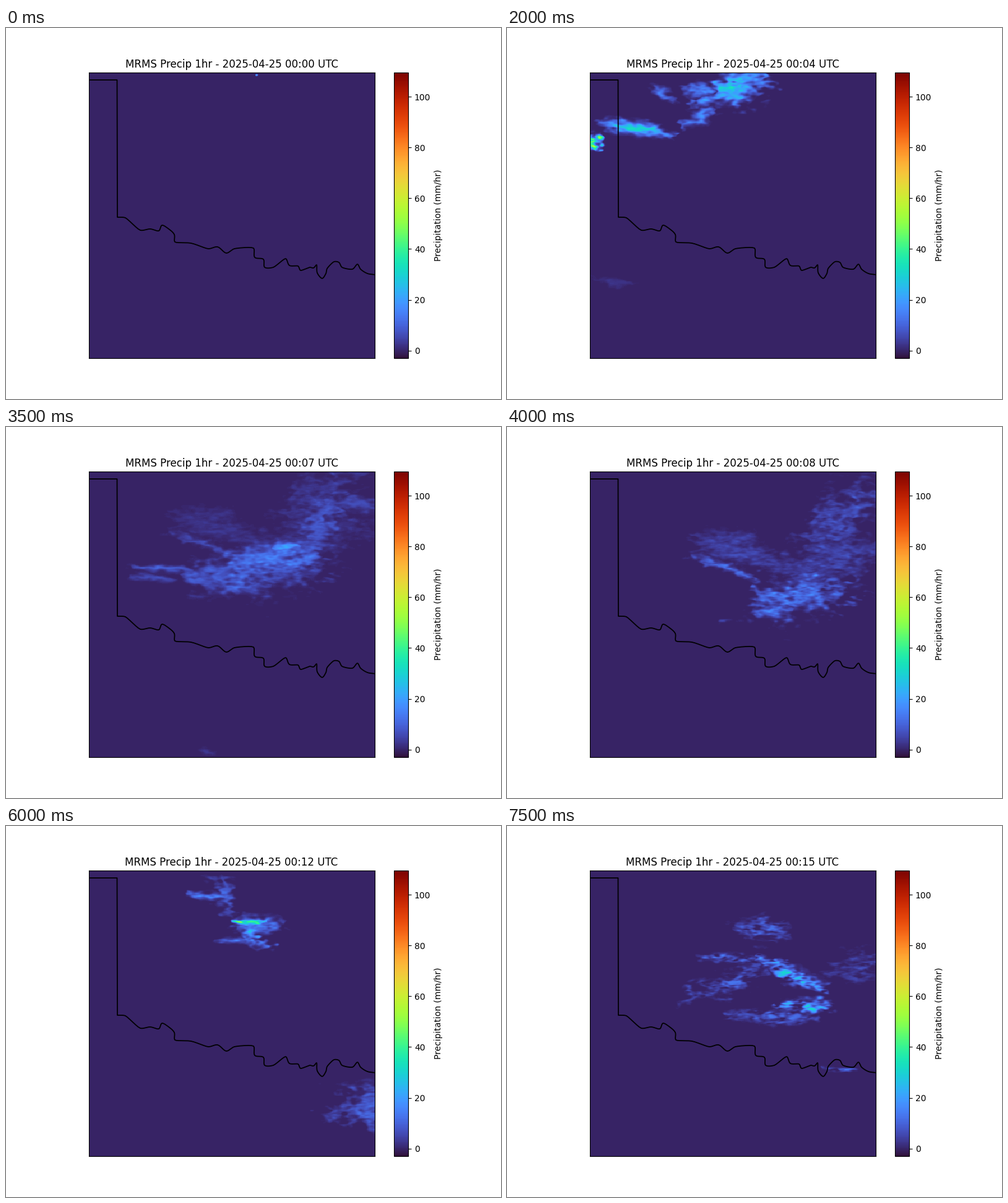
A matplotlib script for the animation above (8 s loop, 800 px wide and 600 px high).

```python
import numpy as np
import matplotlib.pyplot as plt
from matplotlib.animation import FuncAnimation

# Map box in stage pixels and the radar grid inside it
LEFT, RIGHT, TOP, BOTTOM = 134, 596, 72, 534
N = 400
CELL = (RIGHT - LEFT) / N
HOURS = 16
DRIFT = np.array([34, 38])  # storm motion in pixels per hour

mid = (np.arange(N) + 0.5) * CELL
X, Y = np.meshgrid(LEFT + mid, TOP + mid)
FX, FY = np.meshgrid(np.fft.fftfreq(N), np.fft.fftfreq(N))


def noise(rng, scales, stretch):
    """Smooth random field of unit deviation, stretched sideways."""
    total = np.zeros((N, N))
    for s in scales:
        white = np.fft.fft2(rng.standard_normal((N, N)))
        keep = np.exp(-2 * (np.pi * s) ** 2 * ((FX * stretch) ** 2 + FY ** 2))
        layer = np.fft.ifft2(white * keep).real
        total += layer / layer.std()
    return total / total.std()


class Scene:
    """Rain bands (x0, y0, x1, y1, width, peak mm/hr) at one hour."""

    def __init__(self, hour, rough, *bands):
        rng = np.random.default_rng(hour)
        self.hour, self.rough, self.bands = hour, rough, bands
        self.wx = noise(rng, (1.5, 3, 8), 2)
        self.wy = noise(rng, (1.5, 3, 8), 2)
        self.grain = noise(rng, (0.8, 1.8), 3)

    def rain(self, hour):
        """Rain carried along the drift to another hour."""
        dx, dy = DRIFT * (hour - self.hour)
        shift = round(dy / CELL), round(dx / CELL)
        wx, wy, grain = (np.roll(a, shift, (0, 1))
                         for a in (self.wx, self.wy, self.grain))
        total = np.zeros((N, N))
        for x0, y0, x1, y1, width, peak in self.bands:
            px = X - dx - x0 + 0.7 * width * wx
            py = Y - dy - y0 + 0.35 * width * wy
            ex, ey = x1 - x0, y1 - y0
            t = np.clip((px * ex + py * ey) / (ex * ex + ey * ey), 0, 1)
            bulge = np.sin(np.pi * t)
            q = np.hypot(px - t * ex, py - t * ey) / (width * (0.6 + 0.4 * bulge))
            total += (peak * (0.5 + 0.5 * bulge) * np.exp(-q * q)) ** 3
        texture = np.clip(1 + self.rough * grain, 0, 2)
        return np.maximum(np.cbrt(total) * texture - 0.5, 0)


SCENES = [
    Scene(0, 0, (405.5, 76, 408.5, 76, 1.2, 24)),
    Scene(4, 0.12,
          (325, 112, 410, 76, 20, 29), (290, 100, 325, 98, 9, 16),
          (335, 136, 280, 155, 9, 17), (150, 154, 265, 172, 8, 28),
          (132, 177, 150, 191, 9, 52), (234, 92, 270, 116, 6, 13),
          (146, 408, 200, 414, 8, 3)),
    Scene(6, 0.12,
          (170, 188, 270, 192, 5, 20), (168, 203, 235, 209, 6, 13),
          (270, 198, 350, 206, 20, 19), (325, 190, 460, 160, 18, 25),
          (400, 157, 440, 155, 5, 43), (455, 150, 500, 80, 22, 14),
          (490, 82, 575, 95, 8, 12), (280, 485, 302, 490, 5, 6)),
    Scene(8, 0.25,
          (405, 285, 535, 255, 27, 14), (400, 302, 465, 299, 7, 13),
          (430, 225, 600, 200, 25, 6), (310, 185, 450, 215, 18, 5),
          (305, 208, 400, 250, 7, 10), (500, 185, 596, 90, 28, 6)),
    Scene(10, 0.25,
          (445, 368, 605, 358, 19, 15), (470, 392, 545, 386, 7, 13),
          (560, 300, 600, 210, 30, 3), (218, 79, 262, 87, 5, 9),
          (400, 73, 438, 92, 4, 17)),
    Scene(12, 0.2,
          (365, 154, 418, 154, 4, 46), (375, 160, 435, 160, 11, 13),
          (385, 160, 412, 186, 12, 21), (288, 111, 355, 117, 5, 17),
          (340, 85, 365, 140, 12, 9), (335, 187, 400, 183, 4, 11),
          (540, 455, 625, 458, 26, 10)),
    Scene(15, 0.6,
          (410, 215, 525, 268, 9, 17), (440, 290, 525, 294, 8, 17),
          (365, 306, 500, 312, 9, 7), (315, 210, 400, 216, 6, 10),
          (300, 275, 410, 235, 15, 7), (365, 170, 450, 170, 14, 7),
          (520, 235, 600, 215, 18, 4), (510, 391, 568, 395, 3, 8)),
]


def field(hour):
    """Blend the scenes before and after the hour."""
    for a, b in zip(SCENES, SCENES[1:]):
        if hour <= b.hour:
            t = (hour - a.hour) / (b.hour - a.hour)
            return (1 - t) * a.rain(hour) + t * b.rain(hour)


def smooth(points, steps=6):
    """Hermite curve through the points, slopes held by the shorter side."""
    p = np.array(points, float)
    d = np.diff(p, axis=0)
    size = np.linalg.norm(d, axis=1, keepdims=True)
    u = d / size
    inner = (u[:-1] + u[1:]) / 2 * np.minimum(size[:-1], size[1:])
    m = np.vstack([d[:1], inner, d[-1:]])[:, None]
    t = np.linspace(0, 1, steps, endpoint=False)[None, :, None]
    ease = t * t * (3 - 2 * t)
    curve = (p[:-1, None] + ease * d[:, None]
             + t * (1 - t) ** 2 * m[:-1] - t * t * (1 - t) * m[1:])
    return np.vstack([curve.reshape(-1, 2), p[-1:]])


RIVER = [
    (180, 306), (193, 307), (217, 327), (233, 325), (247, 328), (252, 319),
    (263, 325), (272, 334), (273, 346), (299, 348), (327, 357), (342, 354),
    (356, 364), (369, 357), (400, 356), (402, 371), (416, 374), (418, 387),
    (432, 387), (452, 373), (458, 384), (472, 385), (476, 392), (491, 387),
    (497, 388), (502, 383), (503, 396), (511, 405), (517, 397), (519, 389),
    (530, 378), (538, 379), (543, 387), (560, 390), (568, 382), (573, 390),
    (584, 397), (597, 399)]

fig, ax = plt.subplots(figsize=(8, 6), dpi=100)
image = ax.imshow(np.zeros((N, N)), extent=(LEFT, RIGHT, BOTTOM, TOP),
                  cmap="turbo", vmin=-3, vmax=109.55, interpolation="nearest")
border = np.vstack([[(LEFT, 84), (179.5, 84)], smooth(RIVER)])
ax.plot(*border.T, color="black", lw=1.25)
ax.set(xlim=(LEFT, RIGHT), ylim=(BOTTOM, TOP), xticks=[], yticks=[])
fig.colorbar(image, ax=ax, label="Precipitation (mm/hr)")
title = ax.set_title("", x=0.499)


def draw(hour):
    image.set_data(field(hour))
    title.set_text(f"MRMS Precip 1hr - 2025-04-25 00:{hour:02d} UTC")
    return image, title


anim = FuncAnimation(fig, draw, frames=HOURS, interval=500, repeat=True,
                     init_func=lambda: draw(0))
plt.show()
```
